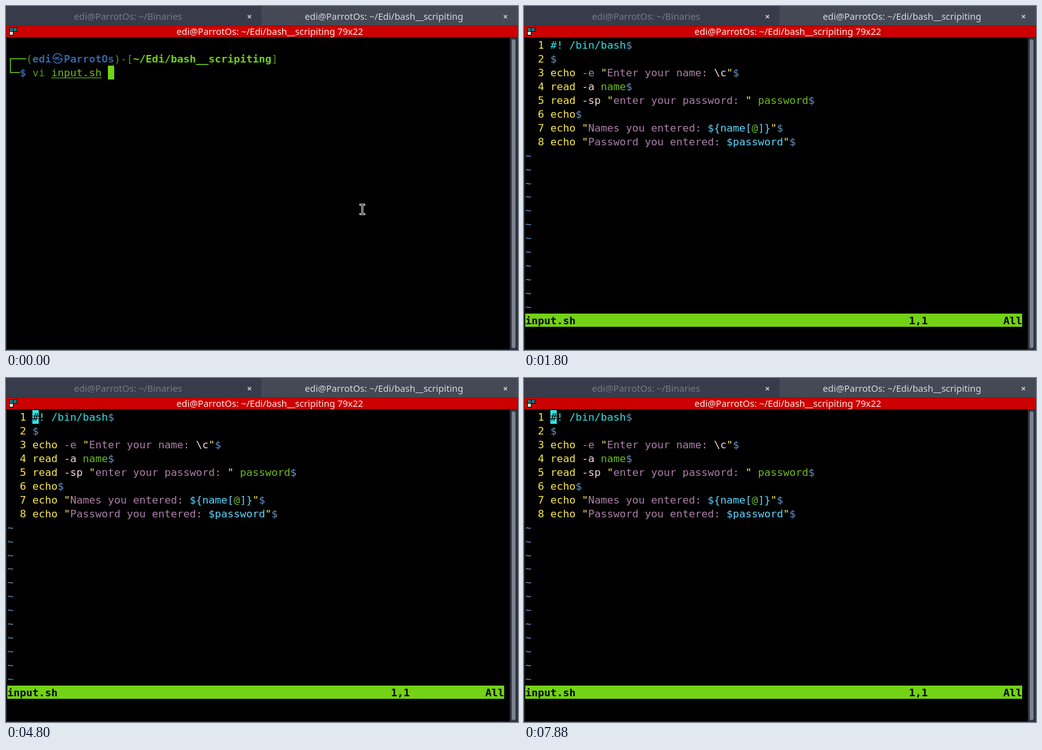
An HTML page with a canvas that plays this animation: 814 by 548 pixels, repeating every 8000 ms.

```html
<!DOCTYPE html>
<html lang="en">
<head>
<meta charset="utf-8">
<title>Terminal</title>
<style>
html, body { margin: 0; width: 100%; height: 100%; overflow: hidden; background: #000; }
canvas { display: block; }
</style>
</head>
<body>
<canvas id="stage" width="814" height="548"></canvas>
<script>
const ctx = document.getElementById('stage').getContext('2d');
const LOOP = 8000, EDITOR_OPENS = 800, BLINK = 600, BLINK_START = 640;
const COL = 10, ROW = 21.95, LEFT = 2, TOP = 51, BASE = 17;
const MONO = '16.61px "DejaVu Sans Mono", monospace';
const SANS = '14.55px "Noto Sans", sans-serif';
const C = {
  frame: '#2f343f', tab: '#383c4a', tabOn: '#444955', red: '#cc0000', pale: '#c8cdd6',
  green: '#4e9a06', lime: '#73d216', name: '#6cbf1c', blue: '#3465a4',
  yellow: '#fce94f', plum: '#ad7fa8', pink: '#ffd7d7', aqua: '#34e2e2', sky: '#5fd7ff', dim: '#6994c6'
};

// Each line is a list of [colour, text] runs.
const SCRIPT = [
  [['aqua', '#! /bin/bash']],
  [],
  [['yellow', 'echo '], ['plum', '-e '], ['yellow', '"'], ['plum', 'Enter your name: '], ['pink', '\\c'], ['yellow', '"']],
  [['yellow', 'read '], ['pink', '-a '], ['name', 'name']],
  [['yellow', 'read '], ['pink', '-sp '], ['yellow', '"'], ['plum', 'enter your password: '], ['yellow', '" '], ['name', 'password']],
  [['yellow', 'echo']],
  [['yellow', 'echo "'], ['plum', 'Names you entered: '], ['sky', '${name['], ['name', '@'], ['sky', ']}'], ['yellow', '"']],
  [['yellow', 'echo "'], ['plum', 'Password you entered: '], ['sky', '$password'], ['yellow', '"']]
];

const x = col => LEFT + col * COL;
const y = row => Math.round(TOP + row * ROW);

function box(color, left, top, w, h) {
  ctx.fillStyle = color;
  ctx.fillRect(left, top, w, h);
}

function put(col, row, text, color, bold) {
  ctx.font = (bold ? 'bold ' : '') + MONO;
  ctx.textAlign = 'left';
  ctx.fillStyle = color;
  ctx.fillText(text, x(col), y(row) + BASE);
}

function label(text, center, base, color) {
  ctx.font = SANS;
  ctx.textAlign = 'center';
  ctx.fillStyle = color;
  ctx.fillText(text, center, base);
}

function cross(cx, cy) {
  ctx.strokeStyle = C.pale;
  ctx.lineWidth = 1.6;
  ctx.beginPath();
  ctx.moveTo(cx - 2.5, cy - 2.5);
  ctx.lineTo(cx + 2.5, cy + 2.5);
  ctx.moveTo(cx + 2.5, cy - 2.5);
  ctx.lineTo(cx - 2.5, cy + 2.5);
  ctx.stroke();
}

function drawWindow() {
  box('#000', 0, 0, 814, 548);
  box(C.tab, 0, 0, 406, 31);
  box(C.tabOn, 406, 0, 408, 31);
  label('edi@ParrotOs: ~/Binaries', 194, 22, '#757a87');
  label('edi@ParrotOs: ~/Edi/bash__scripiting', 601, 22, '#d3dae3');
  cross(387, 17);
  cross(794, 17);

  box('#861018', 0, 31, 814, 19);
  box(C.red, 1, 32, 812, 17);
  label('edi@ParrotOs: ~/Edi/bash__scripiting 79x22', 419.5, 46, '#fbe9e4');
  box('#100808', 5, 34, 13, 13);
  box('#2f7078', 6, 35, 5, 5);
  box('#2f7078', 12, 35, 5, 5);
  box('#d8d8d0', 6, 41, 5, 5);
  box(C.red, 12, 41, 6, 6);

  box(C.frame, 0, 50, 1, 498);
  box(C.frame, 0, 547, 814, 1);
  box(C.frame, 801, 50, 13, 498);
  ctx.fillStyle = '#7c838e';
  ctx.beginPath();
  ctx.roundRect(804, 53, 6, 492, 3);
  ctx.fill();
}

function drawPointer() {
  const beam = (color, grow) => {
    box(color, 563 - grow, 316 - grow, 7 + 2 * grow, 1 + 2 * grow);
    box(color, 563 - grow, 331 - grow, 7 + 2 * grow, 1 + 2 * grow);
    box(color, 566 - grow, 316, 1 + 2 * grow, 16);
  };
  beam('#f0f0f0', 1);
  beam('#000', 0);
}

function drawShell() {
  box(C.green, 6, 83, 26, 2);
  box(C.green, 6, 83, 2, 24);
  box(C.green, 6, 105, 16, 2);
  put(3, 1, '(', C.green);
  put(4, 1, 'edi', C.blue, true);
  ctx.font = 'bold 17px "Noto Sans CJK KR", "Noto Sans CJK JP", sans-serif';
  ctx.textAlign = 'center';
  ctx.fillText('\u327f', x(8), y(1) + BASE);
  put(9, 1, 'ParrotOs', C.blue, true);
  put(17, 1, ')-[', C.green);
  put(20, 1, '~/Edi/bash__scripiting', C.lime, true);
  put(42, 1, ']', C.green);
  put(2, 2, '$', C.blue, true);
  put(4, 2, 'vi', C.green);
  put(7, 2, 'input.sh', C.name);
  box(C.name, x(7), 114, 80, 1);
  box(C.lime, x(16), y(2), COL, 22);
  drawPointer();
}

function drawEditor(cursorOn) {
  SCRIPT.forEach((runs, row) => {
    put(2, row, String(row + 1), C.yellow);
    let col = 4;
    for (const [color, text] of runs) {
      put(col, row, text, C[color]);
      col += text.length;
    }
    put(col, row, '$', C.dim);
  });
  for (let row = SCRIPT.length; row < 20; row++) put(0, row, '~', C.dim);

  box(C.lime, LEFT, y(20), 790, 21);
  put(0, 20, 'input.sh', '#000', true);
  put(61, 20, '1,1', '#000', true);
  put(76, 20, 'All', '#000', true);

  if (cursorOn) {
    box(C.aqua, x(4), y(0), COL, 22);
    put(4, 0, '#', '#000');
  }
}

const start = performance.now();
function frame() {
  const t = (performance.now() - start) % LOOP;
  drawWindow();
  if (t < EDITOR_OPENS) drawShell();
  else drawEditor((t - BLINK_START) % (2 * BLINK) < BLINK);
  requestAnimationFrame(frame);
}
frame();
</script>
</body>
</html>
```
